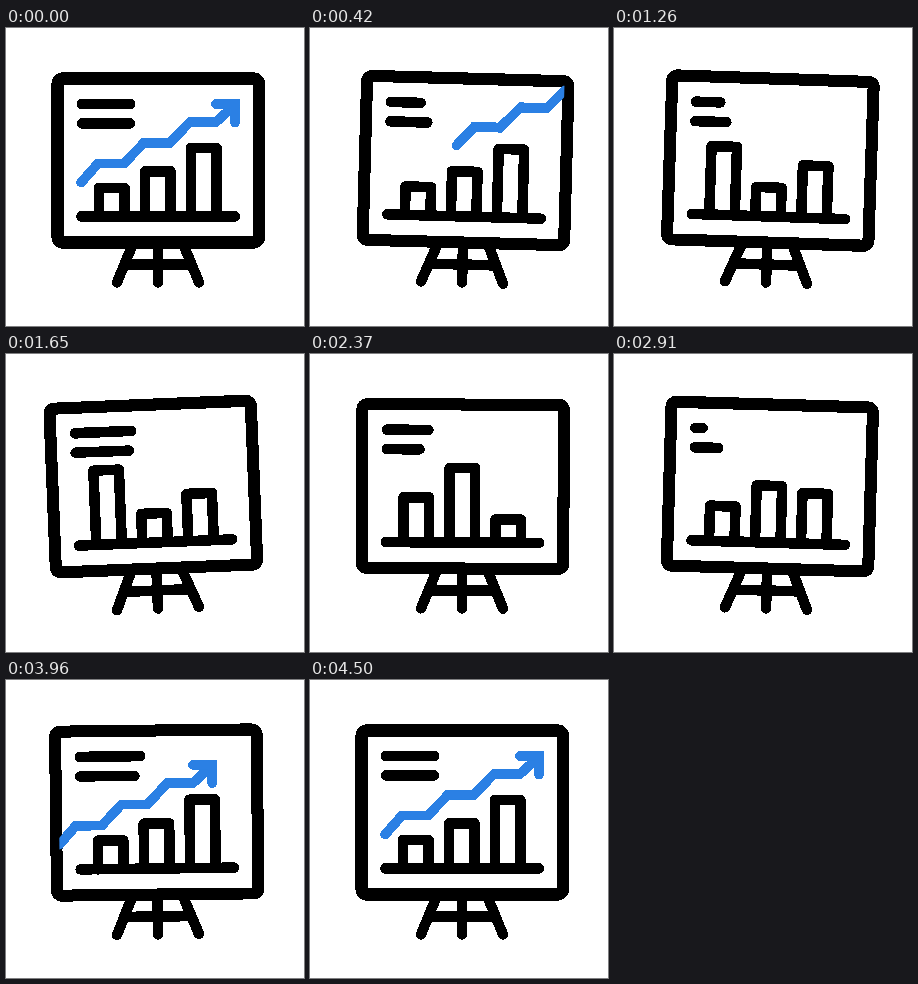
These frames come from a looping animation (298x298 px, 4530 ms). An HTML page with a canvas:

```html
<!DOCTYPE html>
<html lang="en">
<head>
<meta charset="utf-8">
<title>Growth chart</title>
<style>
  html, body { margin: 0; width: 100%; height: 100%; overflow: hidden; background: #fff; }
  canvas { display: block; width: 298px; height: 298px; }
</style>
</head>
<body>
<canvas id="stage" width="298" height="298"></canvas>
<script>
const SIZE = 298;
const LOOP = 4530;
const STEP = 30;
const BEAT = 900;
const PIVOT = { x: 152, y: 254 };
const BASE_Y = 188.5;
const FRAME_WIDTH = 11.3;
const LINE_WIDTH = 9.8;
const EDGE_ALPHA = 30;

const ctx = document.getElementById('stage').getContext('2d', { willReadFrequently: true });

const ease = u => (1 - Math.cos(Math.PI * u)) / 2;
const clamp = u => Math.min(1, Math.max(0, u));
const progress = (t, from, to) => ease(clamp((t - from) / (to - from)));
const beats = (start, count) => Array.from({ length: count }, (_, k) => start + k * BEAT);

// Eases through the values, reaching each one at its time.
function follow(t, times, values) {
  return values.reduce((value, next, i) =>
    i ? value + (next - values[i - 1]) * progress(t, times[i - 1], times[i]) : next, 0);
}

// Each swing goes the other way and one degree less far.
const swing = k => k ? (5 - k) * (k % 2 ? 1 : -1) : 0;
const SWING_TIMES = beats(30, 6);
const SWINGS = SWING_TIMES.map((_, k) => swing(k));

const HEADING_LENGTH = 48;
const HEADINGS = [
  { y: 76, short: 7, long: 67, times: [30, 870, 1950, 2880, 3600, 4500] },
  { y: 95.5, short: 20, long: 57, times: SWING_TIMES }
];

// Every bar rests, moves through two other heights and returns.
const BAR_TIMES = beats(600, 4);
const BARS = [
  { rest: 28.5, first: 76.5, second: 45 },
  { rest: 45, first: 26, second: 74.5 },
  { rest: 68.5, first: 49, second: 23 }
];

function line(...points) {
  ctx.beginPath();
  points.forEach(([x, y]) => ctx.lineTo(x, y));
  ctx.stroke();
}

function drawEasel() {
  ctx.lineWidth = LINE_WIDTH;
  for (const side of [-1, 0, 1]) {
    line([PIVOT.x + side * 26, 218], [PIVOT.x + side * 41, 254.5]);
  }
  line([120, 236.5], [184, 236.5]);
  ctx.lineWidth = FRAME_WIDTH;
  ctx.beginPath();
  ctx.roundRect(51.5, 50.5, 201.5, 164, 5);
  ctx.stroke();
}

function drawChart(t) {
  ctx.lineWidth = LINE_WIDTH;
  for (const { y, short, long, times } of HEADINGS) {
    const lengths = [HEADING_LENGTH, short, long, short, long, HEADING_LENGTH];
    line([76, y], [76 + follow(t, times, lengths), y]);
  }
  BARS.forEach(({ rest, first, second }, i) => {
    const left = 93 + 46 * i;
    const right = left + 25.5;
    const top = BASE_Y - follow(t, BAR_TIMES, [rest, first, second, rest]);
    line([left, BASE_Y], [left, top], [right, top], [right, BASE_Y]);
  });
  line([75.5, BASE_Y], [229, BASE_Y]);
}

function drawArrow(t) {
  const leave = progress(t, 30, 960);
  const enter = 1 - progress(t, 3090, 4200);
  ctx.save();
  ctx.beginPath();
  ctx.rect(54.5, 55, 194.5, 156);
  ctx.clip();
  if (leave < 1) ctx.translate(181 * leave, -98.5 * leave);
  else ctx.translate(-188 * enter, 84 * enter);
  ctx.strokeStyle = '#2b80e4';
  ctx.lineWidth = 9;
  ctx.lineJoin = 'miter';
  const steps = [0, 1, 2].flatMap(i => {
    const x = 92 + 46 * i;
    const y = 135.5 - 20.75 * i;
    return [[x, y], [x + 26, y]];
  });
  line([75, 154.5], ...steps, [228, 77.5]);
  line([210, 76], [229, 76], [229, 94.5]);
  ctx.restore();
}

// Gives every shape a hard edge without soft pixels.
function hardenEdges() {
  const image = ctx.getImageData(0, 0, SIZE, SIZE);
  for (let i = 3; i < image.data.length; i += 4) {
    image.data[i] = image.data[i] > EDGE_ALPHA ? 255 : 0;
  }
  ctx.putImageData(image, 0, 0);
}

function draw(t) {
  ctx.clearRect(0, 0, SIZE, SIZE);
  ctx.save();
  ctx.translate(PIVOT.x, PIVOT.y);
  ctx.rotate(follow(t, SWING_TIMES, SWINGS) * Math.PI / 180);
  ctx.translate(-PIVOT.x, -PIVOT.y);
  ctx.strokeStyle = '#000';
  ctx.lineCap = ctx.lineJoin = 'round';
  drawEasel();
  drawChart(t);
  drawArrow(t);
  ctx.restore();
  hardenEdges();
}

const start = performance.now();
function frame() {
  const t = (performance.now() - start) % LOOP;
  draw(Math.floor(t / STEP) * STEP);
  requestAnimationFrame(frame);
}
frame();
</script>
</body>
</html>
```
